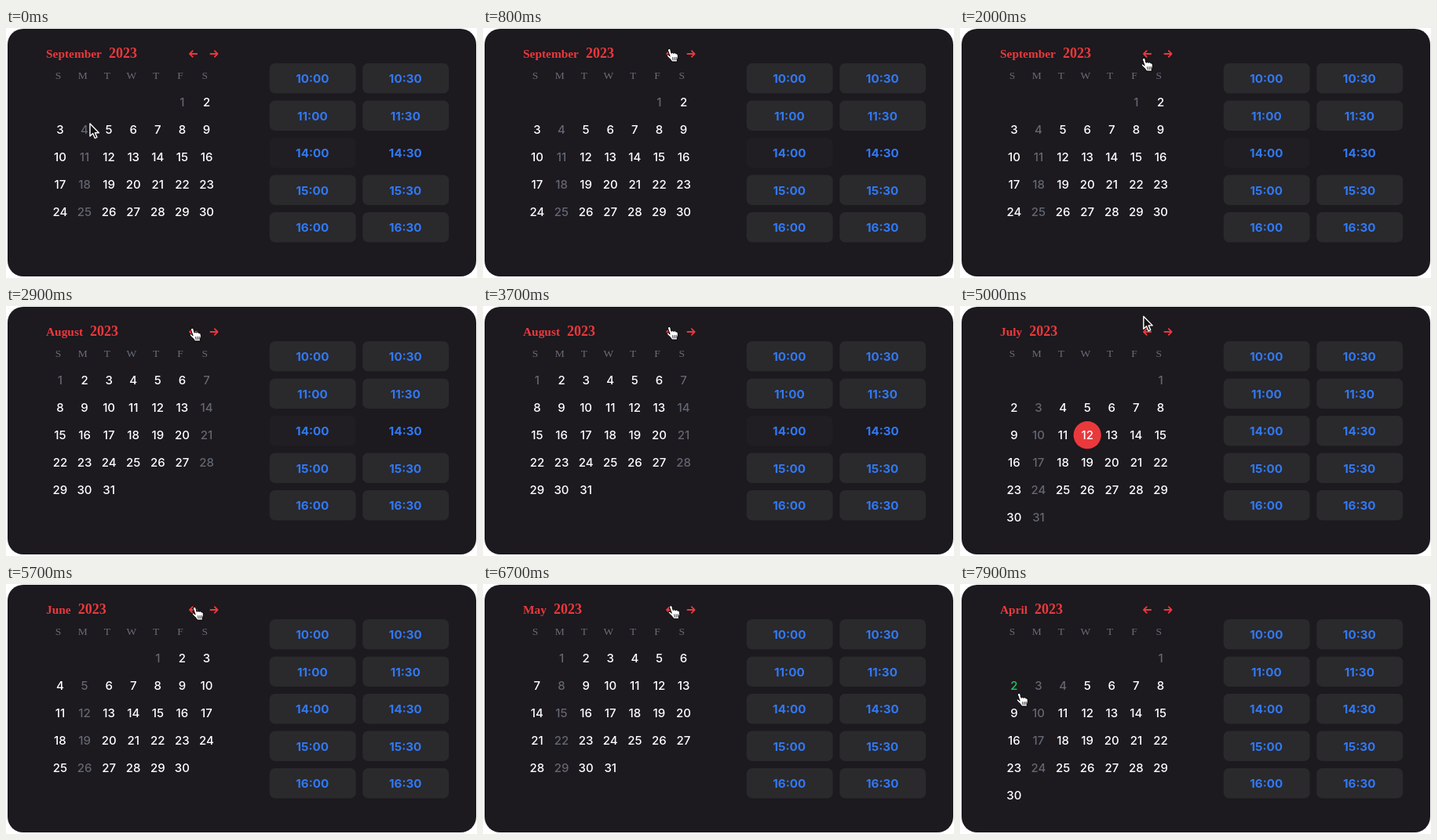
Write an HTML page with a canvas that moves like this. It is 600 px wide and 319 px high and loops after 8000 ms.

```html
<!DOCTYPE html>
<html lang="en">
<head>
<meta charset="utf-8">
<title>Booking calendar</title>
<style>
html, body { margin: 0; width: 100%; height: 100%; overflow: hidden; background: #fff; }
canvas { display: block; width: 600px; height: 319px; }
</style>
</head>
<body>
<canvas id="stage"></canvas>
<script>
const W = 600, H = 319, LOOP = 8000, STEP = 100;
const canvas = document.getElementById('stage');
const ctx = canvas.getContext('2d');
const dpr = window.devicePixelRatio || 1;
canvas.width = W * dpr;
canvas.height = H * dpr;

const RED = '#ea393c', BLUE = '#3179f5', GRAY = '#636771', GREEN = '#22c55e';
const SERIF = '"Liberation Serif", serif', SANS = 'Inter, sans-serif';
const COL = 31.1, ROW = 35;

// lead: empty cells before day 1; monday: first closed Monday
const months = [
  { from: 0, name: 'September', lead: 5, days: 30, monday: 4 },
  { from: 2800, name: 'August', lead: 0, days: 31, monday: 7 },
  { from: 3800, name: 'July', lead: 6, days: 31, monday: 3, picked: 12 },
  { from: 5300, name: 'June', lead: 4, days: 30, monday: 5 },
  { from: 6200, name: 'May', lead: 1, days: 31, monday: 1 },
  { from: 7000, name: 'April', lead: 6, days: 30, monday: 3, closed: 4 }
];
const PICK_TIME = 4200;

// time, x, y of the pointer tip
const path = [
  [0, 107, 122], [200, 111, 117], [600, 236, 15], [800, 237, 27],
  [1400, 238, 29], [2000, 234, 39], [2700, 237, 29], [3800, 237, 27],
  [4200, 160, 161], [4300, 157, 159], [4400, 147, 150], [4900, 232, 8],
  [5200, 239, 28], [5700, 240, 30], [7000, 239, 28], [7300, 238, 27],
  [7800, 75, 140], [8000, 75, 140]
];

function pointerAt(t) {
  const i = Math.max(1, path.findIndex(k => k[0] >= t));
  const [t0, x0, y0] = path[i - 1], [t1, x1, y1] = path[i];
  const u = (t - t0) / (t1 - t0), e = u * u * (3 - 2 * u);
  return { x: x0 + (x1 - x0) * e, y: y0 + (y1 - y0) * e };
}

function text(str, x, y, font, color, align = 'center') {
  ctx.font = font;
  ctx.fillStyle = color;
  ctx.textAlign = align;
  ctx.fillText(str, x, y);
}

function box(x, y, w, h, r, color) {
  ctx.fillStyle = color;
  ctx.beginPath();
  ctx.roundRect(x, y, w, h, r);
  ctx.fill();
}

function navArrow(x, dir) {
  ctx.strokeStyle = RED;
  ctx.lineWidth = 1.8;
  ctx.lineCap = ctx.lineJoin = 'round';
  ctx.beginPath();
  ctx.moveTo(x - 4.6 * dir, 33);
  ctx.lineTo(x + 4.6 * dir, 33);
  ctx.moveTo(x + 0.8 * dir, 29.2);
  ctx.lineTo(x + 4.6 * dir, 33);
  ctx.lineTo(x + 0.8 * dir, 36.8);
  ctx.stroke();
}

const isOpen = (m, d) => d !== 1 && d !== m.closed && (d - m.monday) % 7 !== 0;

function dayUnder(m, p) {
  const c = Math.floor((p.x - 53.4) / COL), r = Math.floor((p.y - 112.5) / ROW) + 1;
  const d = r * 7 + c - m.lead + 1;
  return c >= 0 && c < 7 && d >= 1 && d <= m.days && isOpen(m, d) ? d : 0;
}

function drawCalendar(m, t, hover) {
  const titleFont = 'bold 15.4px ' + SERIF;
  text(m.name, 51, 38, titleFont, RED, 'left');
  const yearX = 51 + ctx.measureText(m.name).width + 9;
  text('2023', yearX, 38, 'bold 18px ' + SERIF, RED, 'left');
  navArrow(238.6, -1);
  navArrow(265, 1);

  [...'SMTWTFS'].forEach((s, i) =>
    text(s, 66.6 + i * COL, 65, '13.5px ' + SERIF, '#696d78'));

  for (let d = 1; d <= m.days; d++) {
    const n = m.lead + d - 1;
    const x = 68.9 + (n % 7) * COL, y = 94.7 + Math.floor(n / 7) * ROW;
    const picked = d === m.picked && t >= PICK_TIME;
    if (picked) {
      ctx.fillStyle = RED;
      ctx.beginPath();
      ctx.arc(x, y, 17.6, 0, Math.PI * 2);
      ctx.fill();
    }
    const color = picked ? '#fff' : !isOpen(m, d) ? GRAY : d === hover ? GREEN : '#fff';
    text(d, x, y + 5.5, '500 15px ' + SANS, color);
  }
}

function drawSlots(t) {
  [10, 11, 14, 15, 16].forEach((hour, r) => {
    [':00', ':30'].forEach((min, c) => {
      const x = 335.7 + c * 118.5, y = 45 + r * 47.5;
      const taken = hour === 14 && t < PICK_TIME;
      if (!taken) box(x, y, 110, 38.4, 7, '#2a292c');
      else if (c === 0) box(x, y, 110, 38.4, 7, '#201e22');
      text(hour + min, x + 54.6, y + 25, 'bold 15.2px ' + SANS, BLUE);
    });
  });
}

const handShape = new Path2D(
  'M-1.5 1.2Q-1.5-.7 .1-.7Q1.6-.6 1.9 .8L3 5.3Q4.4 3.7 5.8 5.2Q7.5 4 8.7 5.8' +
  'Q10.7 5.1 11.2 7.4Q11.9 10 10.7 12.4L10.3 16H3.7Q2.6 13.2-1.2 10.3' +
  'Q-4 7.6-2.5 6.8Q-1.2 6.3 .9 8.8Z');
const handLines = new Path2D('M4.6 10.6L5 13.9M6.9 10.5L7.1 13.9M9.1 10.4L9.1 13.8');
const arrowShape = new Path2D('M0 0V16L3.7 12.6L6.2 18.6L8.9 17.4L6.4 11.7H11.4Z');

function drawPointer(p, hand) {
  ctx.save();
  ctx.translate(p.x, p.y);
  ctx.lineJoin = 'round';
  ctx.lineWidth = hand ? 1 : 1.4;
  ctx.fillStyle = hand ? '#fff' : '#111';
  ctx.strokeStyle = hand ? '#000' : '#fff';
  const shape = hand ? handShape : arrowShape;
  ctx.fill(shape);
  ctx.stroke(shape);
  if (hand) {
    ctx.lineWidth = 0.8;
    ctx.stroke(handLines);
  }
  ctx.restore();
}

function draw(t) {
  const month = months.filter(m => m.from <= t).pop();
  const p = pointerAt(t);
  const hover = dayUnder(month, p);
  const onNav = p.x > 226 && p.x < 250 && p.y > 20 && p.y < 45;

  ctx.setTransform(dpr, 0, 0, dpr, 0, 0);
  ctx.fillStyle = '#fff';
  ctx.fillRect(0, 0, W, H);
  box(2, 1, 597, 316, 20, '#1c191f');
  drawCalendar(month, t, hover);
  drawSlots(t);
  drawPointer(p, onNav || hover > 0);
}

const start = performance.now();
function tick() {
  const t = (performance.now() - start) % LOOP;
  draw(Math.floor(t / STEP) * STEP);
  requestAnimationFrame(tick);
}
tick();
</script>
</body>
</html>
```
